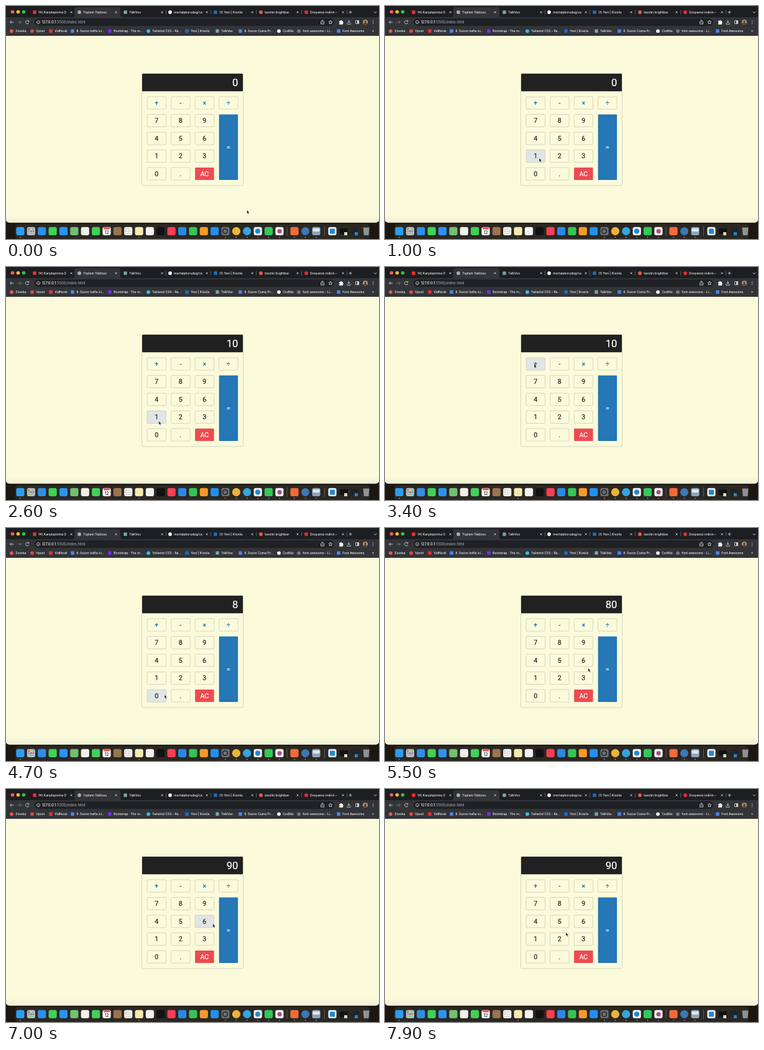
Recreate the animation shown at these times as an HTML page. Size 600 px wide and 375 px high, loop 8 s.

```html
<!DOCTYPE html>
<html lang="tr">
<head>
<meta charset="utf-8">
<style>
html, body { margin: 0; width: 100%; height: 100%; overflow: hidden; background: #1c1711; }
svg { display: block; width: 600px; height: 375px; }
text { font: 500 5px Inter, "Open Sans", sans-serif; fill: #f1f1f2; white-space: pre; }
.calc text { font: 10.6px Roboto, Arial, sans-serif; fill: #222; stroke: #222; stroke-width: .2; text-anchor: middle; }
.calc .op { fill: #2576b2; stroke: none; font-weight: bold; }
.calc .light { fill: #fff; stroke: #fff; }
.calc #display { font-size: 16.6px; fill: #fff; stroke: #fff; text-anchor: end; }
.line { fill: none; stroke: #d9dadc; stroke-width: .85; }
</style>
</head>
<body>
<svg id="stage" viewBox="0 0 600 375"></svg>
<script>
const stage = document.getElementById('stage');
const rect = (x, y, w, h, fill, r = 0, extra = '') =>
  `<rect x="${x}" y="${y}" width="${w}" height="${h}" rx="${r}" fill="${fill}" ${extra}/>`;
const dot = (x, y, r, fill) => `<circle cx="${x}" cy="${y}" r="${r}" fill="${fill}"/>`;
const label = (x, y, s, extra = '') => `<text x="${x}" y="${y}" ${extra}>${s}</text>`;
const line = (d, extra = '') => `<path class="line" d="${d}" ${extra}/>`;
const square = (x, y, r, fill) => rect(x - r, y - r, 2 * r, 2 * r, fill, .7);

const red = '#f03030', blue = '#1670c4', teal = '#74aa9c', azure = '#4688f1', purple = '#7a2df0';
const favicon = (x, y, c) => [red, blue, teal, azure, purple].includes(c) ? square(x, y, 2.7, c) : dot(x, y, 2.9, c);

function browser() {
  const tabs = [
    [46, '14) Karşılaştırma O', red], [118, 'Toplam Tablosu', '#a9abae'],
    [192, 'TalkVex', teal], [264, 'mertalpkorudag/ca', '#f2f2f2'],
    [337, '(1) Yeni | Kivelis', blue], [410, 'tavolin brightbar', '#e9594c'],
    [483, 'Dosyanızı indirin –', '#e52d35']
  ];
  const marks = [
    [9, 'Zoveka', '#e9594c'], [42, 'Vpost', '#e44a3d'], [72, 'VidNook', red],
    [107, '8. Sezon hafta ici...', azure], [167, 'Bootstrap · The m...', purple],
    [229, 'Tailwind CSS - Ra...', '#38bdf8'], [291, 'Yeni | Kivelis', blue],
    [340, 'TalkVex', teal], [377, '8. Sezon Cuma Pr...', azure],
    [439, 'CodNix', '#f2f2f2'], [471, 'font-awesome - Li...', '#77797d'],
    [535, 'Font Awesome', azure]
  ];
  let s = rect(0, 0, 600, 48, '#333438') + rect(0, 0, 600, 18, '#1d1e21');
  s += '<path d="M107 18q3 0 3-3V5q0-3 3-3h68q3 0 3 3v10q0 3 3 3z" fill="#333438"/>';
  ['#ff5f57', '#febc2e', '#28c840'].forEach((c, i) => s += dot(10.5 + i * 9, 9.5, 2.8, c));
  tabs.forEach(([x, name, c], i) => {
    s += favicon(x, 10, c) + label(x + 6.3, 11.9, name);
    s += line(`M${x + 57.6} 8.5l3 3m0-3l-3 3`);
    if (i > 1) s += line(`M${x + 65.5} 6.5v7`, 'stroke-opacity=".4"');
  });
  s += line('M551.5 10h5m-2.5-2.5v5M591.5 9l2.3 2.3l2.3-2.3');

  s += rect(46, 20, 482, 12, '#202124', 6);
  s += line('M12.5 26h-6m2.5-2.5L6.5 26l2.5 2.5');
  s += line('M18.5 26h6m-2.5-2.5l2.5 2.5l-2.5 2.5', 'stroke-opacity=".45"');
  s += line('M36.3 24.3a2.7 2.7 0 1 0 .4 2.7M36.8 22.8v2h-2');
  s += line('M52 23.5a2.5 2.5 0 1 0 .01 0M52 25.8v1.6');
  s += label(57.7, 28, '127.0.0.1<tspan fill="#9aa0a6">:5500/index.html</tspan>', 'style="font-size:5.8px"');
  s += line('M507.5 25h-1v4h5v-4h-1M509 27.5v-5m-1.5 1.5l1.5-1.5l1.5 1.5');
  s += line('M522 23l.9 2l2.1.2l-1.6 1.4l.5 2.1l-1.9-1.1l-1.9 1.1l.5-2.1l-1.6-1.4l2.1-.2z');
  s += '<path d="M536 24h1.8a1.2 1.2 0 0 1 2.4 0h1.8v1.8a1.2 1.2 0 0 1 0 2.2v1.8h-6v-2a1.1 1.1 0 0 0 0-2z" fill="#f1f1f2"/>';
  s += line('M551.5 22.5v4.5m-2-2l2 2l2-2M548.8 27.5v1.7h5.4v-1.7');
  s += line('M562.5 23.5h5v5h-5z') + rect(565, 23.5, 2.5, 5, '#d9dadc');
  s += dot(578, 26, 4, '#b59372') + dot(578, 25, 1.6, '#4c3a30') + rect(575.5, 26.8, 5, 2.6, '#4c3a30', 1.2);
  [23.6, 26, 28.4].forEach(y => s += dot(590.5, y, .65, '#d5d6d8'));
  marks.forEach(([x, name, c]) => s += favicon(x, 40.3, c) + label(x + 6.2, 42.1, name));
  return s + label(589, 42, '»');
}

function page() {
  return '<linearGradient id="shade" x2="0" y2="1"><stop stop-color="#fbfbdb"/><stop offset="1" stop-color="#efefd6"/></linearGradient>' +
    rect(0, 44, 600, 304.5, '#fbfbdb', 5) + rect(0, 336, 600, 12.5, 'url(#shade)', 5);
}

function dock() {
  const colors = ('#2b9df0 #b9bec5 #2d8fe8 #3fd158 #2a93f3 #72c072 #f1efec #3fd158 #f8f8f8 #9b7450 ' +
    '#f4f4f2 #f6e9b0 #f1f1f1 #111214 #f83e53 #2b87e6 #36c455 #f59a28 #228ff0 #6c6f73 ' +
    '#e8b53a #31a5e1 #f1f5f8 #32c85a #f3f1f3').split(' ');
  const running = [0, 11, 19, 20, 21, 22, 23, 24];
  const icon = (x, c) => rect(x - 6.6, 355.8, 13.2, 13.2, c, 3);
  let s = rect(15, 351, 570, 24, '#2b2722', 5);
  colors.forEach((c, i) => {
    const x = 23 + i * 17.37;
    s += i == 20 || i == 21 ? dot(x, 362.4, 6.6, c) : icon(x, c);
    if (running.includes(i)) s += dot(x, 372.3, .7, '#ddd');
  });
  s += rect(157, 356.3, 10, 3, '#ef4a42', 1);
  s += label(162, 367, '12', 'text-anchor="middle" style="font-size:7px;fill:#333"');
  for (let i = 0; i < 9; i++)
    s += square(36.7 + i % 3 * 3.6, 358.8 + (i / 3 | 0) * 3.6, 1.1, `hsl(${i * 67} 70% 55%)`);
  for (let i = 0; i < 3; i++) {
    s += dot(193, 359 + i * 3.5, .8, ['#3d87ef', '#ef4a42', '#f59a28'][i]);
    s += rect(195, 358.6 + i * 3.5, 6, .8, '#bbb');
  }
  s += '<circle cx="352.5" cy="362.4" r="3.8" fill="none" stroke="#2b2d30" stroke-width="1.8"/>';
  s += icon(464, '#f26a3a') + dot(481.5, 362.4, 6.5, '#3d77b5') + icon(499, '#8da6bd') + icon(525, '#e8f1f8');
  s += square(525, 362.4, 4, '#2487cf') + dot(405, 362.4, 4.2, '#2487cf') + dot(440, 362.4, 3.5, '#a74e83');
  s += rect(493.5, 358, 11, 5, '#dfe7eb', 1);
  [464, 481.5, 499].forEach(x => s += dot(x, 372.3, .7, '#ddd'));
  s += line('M452 355v15M512.5 355v15', 'stroke-opacity=".35"');
  s += rect(537, 358, 13, 9, '#121212') + rect(544, 364, 5, 5, '#d9d9b9');
  s += rect(555, 357, 12, 9, '#202327') + rect(561, 364, 5, 5, '#2487cf');
  s += '<path d="M574.5 356.5h10l-1.2 12.5h-7.6z" fill="#8e9295"/>';
  return s;
}

// Calculator keys, row by row
const keys = [];
['+-×÷', '789', '456', '123', '0.C'].forEach((row, r) => [...row].forEach((k, c) =>
  keys.push({ name: k == 'C' ? 'AC' : k, x: 227 + c * 38.55, y: 146 + r * 28.53, h: 20 })));
keys.push({ name: '=', x: 342.65, y: 174.5, h: 105.6 });
keys.forEach(k => {
  k.kind = k.name == '=' ? 'equal' : k.name == 'AC' ? 'clear' : 'plain';
});
const fills = { equal: ['#2577b6', '#418fca'], clear: ['#ec4b51', '#d93a42'], plain: ['#fbfbdb', '#e0e5e6'] };
const edges = { equal: 'none', clear: 'none', plain: '#cbcbbb' };

function calculator() {
  let s = rect(218.5, 108.5, 163, 180.5, '#fbfbdb', 2, 'stroke="#cbcbbb" stroke-width=".8"');
  s += rect(219, 109, 162, 28.3, '#212121', 1) + label(373.3, 128.9, '0', 'id="display"');
  keys.forEach(k => {
    const style = '+-×÷'.includes(k.name) ? 'op' : k.kind == 'plain' ? '' : 'light';
    s += rect(k.x, k.y, 30.5, k.h, fills[k.kind][0], 1, `class="key" stroke="${edges[k.kind]}" stroke-width=".8"`);
    s += label(k.x + 15.2, k.y + k.h / 2 + 3.7, k.name, `class="${style}"`);
  });
  return `<g class="calc">${s}</g>`;
}

stage.innerHTML = page() + browser() + calculator() + dock() +
  '<path id="cursor" d="M0 0v5.6l1.3-1.1l1 2.2l1-.5l-1-2.1h1.8z" fill="#111" stroke="#fff" stroke-width=".4"/>';
const display = document.getElementById('display');
const cursor = document.getElementById('cursor');
const keyShapes = stage.querySelectorAll('.key');

// Pointer stops: time, x, y
const path = [
  [0, 387.5, 328.5], [200, 387.5, 328.5], [900, 248, 245], [1400, 248, 245], [1800, 247, 265],
  [2400, 247, 265], [3200, 240, 156.5], [3600, 240, 156.5], [4000, 282, 183], [4300, 282, 183],
  [4700, 255, 268.5], [5100, 255, 268.5], [5700, 352, 210.5], [6700, 352, 210.5],
  [7500, 291, 231], [8000, 291, 231]
];
const shown = [[0, '0'], [1300, '1'], [2200, '10'], [4200, '8'], [5000, '80'], [6000, '90']];

function pointer(t) {
  const i = path.findIndex(p => p[0] > t);
  const [t0, x0, y0] = path[i - 1], [t1, x1, y1] = path[i];
  const u = (t - t0) / (t1 - t0), e = u * u * (3 - 2 * u);
  return [x0 + (x1 - x0) * e, y0 + (y1 - y0) * e];
}

function draw(now) {
  const t = Math.floor(now % 8000 / 100) * 100;
  const [x, y] = pointer(t);
  cursor.setAttribute('transform', `translate(${x} ${y})`);
  display.textContent = shown.findLast(s => s[0] <= t)[1];
  keys.forEach((k, i) => {
    const over = x >= k.x && x <= k.x + 30.5 && y >= k.y && y <= k.y + k.h;
    keyShapes[i].setAttribute('fill', fills[k.kind][+over]);
  });
  requestAnimationFrame(() => draw(performance.now()));
}
draw(performance.now());
</script>
</body>
</html>
```
